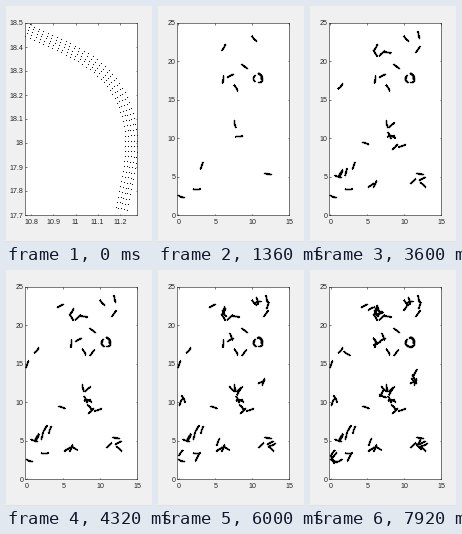
Write a matplotlib script that moves like this. It is 146x236 px and loops after 8 s.

```python
import numpy as np
import matplotlib.pyplot as plt
from matplotlib.animation import FuncAnimation
from matplotlib.lines import Line2D

W, H, DPI = 146, 236, 100
PX = 72 / DPI
FRAMES, STEP_MS = 100, 80
ROWS, COLS = 5, 46
TOTAL = 80
INK = "#262626"
LEFT, RIGHT, TOP, BOTTOM = 19.4, 131, 17, 209

plt.rcParams["font.family"] = "Liberation Sans"
rng = np.random.default_rng(4)

# Opening lanes: centre and heading in degrees.
OPENING = [
    (2.4, 3.4, 3), (6.0, 17.7, 83), (0.3, 2.45, -15), (7.75, 16.6, -60),
    (12.1, 5.4, -5), (8.2, 10.3, 5), (6.1, 21.9, 60), (7.0, 18.2, 25),
    (10.2, 23.0, -45), (8.9, 19.4, -35), (7.6, 11.9, -78), (3.1, 6.5, 70),
]
# Places that later lanes reach one after another.
SPOTS = [
    (1.4, 5.5), (6.9, 21.1), (12.5, 4.0), (4.7, 9.4), (11.9, 23.5), (6.0, 4.1),
    (11.8, 21.6), (1.3, 16.8), (4.5, 22.6), (0.0, 15.0), (0.6, 10.5), (11.2, 12.7),
]
RING = np.array([10.75, 17.85])


def ribbon(heading, bend, length, width=0.052):
    """Dot grid along a lane whose heading eases by `bend` degrees."""
    u = np.clip((np.linspace(0, 1, COLS) - 0.12) / 0.8, 0, 1)
    angle = np.radians(heading + bend * u * u * (3 - 2 * u))
    ds = length / (COLS - 1)
    x = np.r_[0, np.cumsum(np.cos(angle[:-1]))] * ds
    y = np.r_[0, np.cumsum(np.sin(angle[:-1]))] * ds
    off = np.linspace(-width / 2, width / 2, ROWS)[:, None]
    return np.array([x - off * np.sin(angle), y + off * np.cos(angle)])


def lane(x, y, heading=None, bend=None):
    """Small lane centred on a point, kept right of the left edge."""
    if heading is None:
        heading = rng.choice([-1, 1]) * rng.uniform(5, 80)
    if bend is None:
        bend = rng.uniform(-30, 30)
    dots = ribbon(heading - bend / 2, bend, 0.97)[:, ::2, ::2]
    dots += (np.array([x, y]) - dots.mean(axis=(1, 2)))[:, None, None]
    dots[0] += max(0, -0.2 - dots[0].min())
    return dots


def ring_arc(degrees):
    a = np.radians(degrees)
    x, y = RING + 0.55 * np.array([np.cos(a), np.sin(a)])
    return lane(x, y, degrees + 90, 85)


def build():
    start = np.array([10.784, 18.47])[:, None, None]
    lanes = [lane(*spec) for spec in OPENING]
    lanes.insert(3, ring_arc(180))
    lanes.insert(5, ring_arc(-40))
    lanes.insert(0, ribbon(-23, -80, 0.99) + start)
    places = [spec[:2] for spec in OPENING]
    spots = iter(SPOTS)
    for k in range(TOTAL - len(lanes)):
        spot = next(spots, None) if k % 3 == 0 else None
        if spot:
            places.append(spot)
            lanes.append(lane(*spot))
        elif k % 24 == 8:
            lanes.append(ring_arc(250 - 6 * k))
        else:
            x, y = rng.normal(places[rng.integers(len(places))], 0.65)
            lanes.append(lane(np.clip(x, 0.2, 12.7), np.clip(y, 2.4, 23.6)))
    return [dots.reshape(2, -1).T for dots in lanes]


def shown(frame):
    """Three quick lanes, then bursts of four with a pause."""
    if frame < 4:
        return min(frame + 1, 3)
    burst, step = divmod(frame - 4, 5)
    return 3 + 4 * burst + min(step + 1, 4)


def steps(n):
    """Tick steps for x and y as the map grows."""
    if n == 1:
        return 0.1, 0.1
    return (2 if n < 4 else 5), (2 if n < 8 else 5)


def ticks(lo, hi, step):
    first, last = np.ceil(lo / step - 1e-6), np.floor(hi / step + 1e-6)
    return np.round(np.arange(first, last + 0.5) * step, 3) + 0.0


fig = plt.figure(figsize=(W / DPI, H / DPI), dpi=DPI, facecolor="#f0f0f0")
fig.add_artist(Line2D([0, 1], [1.5 / H] * 2, color="#e0e0e0", lw=PX))
ax = fig.add_axes([LEFT / W, 1 - BOTTOM / H, (RIGHT - LEFT) / W, (BOTTOM - TOP) / H])
for spine in ax.spines.values():
    spine.set(color=INK, linewidth=0.6 * PX)
ax.tick_params(direction="in", length=1.5 * PX, width=0.6 * PX, color=INK,
               labelcolor=INK, labelsize=7.2 * PX, top=True, right=True)
ax.tick_params(axis="x", pad=3.5 * PX)
ax.tick_params(axis="y", pad=1.8 * PX)
dots = ax.scatter([], [], s=(1.15 * PX) ** 2, color="black", linewidths=0)
lanes = build()


def draw(frame):
    n = shown(frame)
    xy = np.concatenate(lanes[:n])
    xstep, ystep = steps(n)
    (x0, y0), (x1, y1) = xy.min(axis=0), xy.max(axis=0)
    y0, y1 = np.floor(y0 / ystep) * ystep, np.ceil(y1 / ystep) * ystep
    if n >= 8:
        x1 = np.ceil(x1 / xstep) * xstep
    xt, yt = ticks(x0, x1, xstep), ticks(y0, y1, ystep)
    ax.set_xticks(xt, [f"{v:g}" for v in xt])
    ax.set_yticks(yt, [f"{v:g}" for v in yt])
    ax.set(xlim=(x0, x1), ylim=(y0, y1))
    dots.set_offsets(xy)
    return dots,


anim = FuncAnimation(fig, draw, frames=FRAMES, interval=STEP_MS,
                     repeat=True, repeat_delay=0, blit=False)
plt.show()
```
